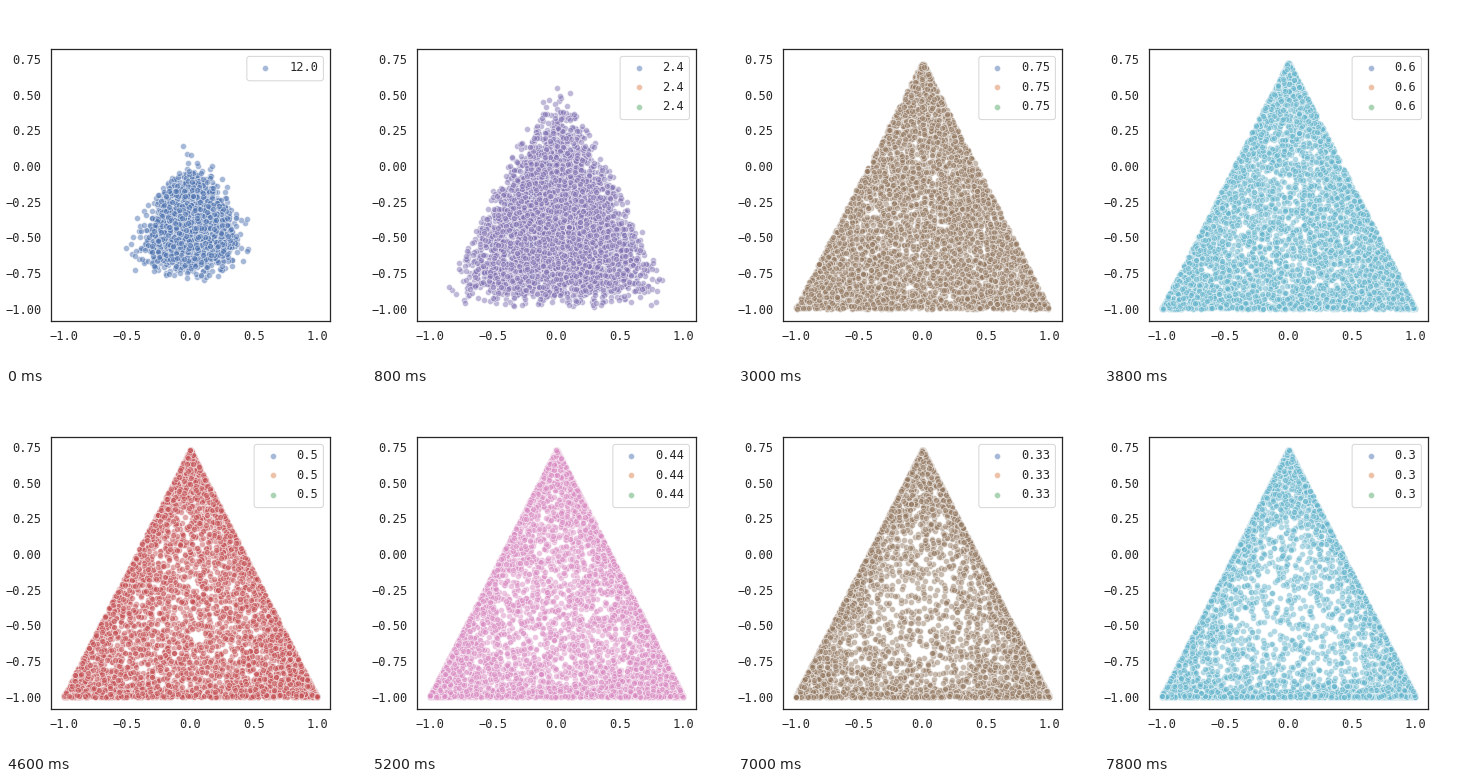
Recreate the animation shown at these times as a matplotlib script. Size 360x360 px, loop 8 s.

```python
import matplotlib.pyplot as plt
import numpy as np
from matplotlib.animation import FuncAnimation
from matplotlib.patches import FancyBboxPatch

SIZE, DPI = 360, 72
FRAMES, STEP_MS = 40, 200
POINTS = 5000
INK = "0.15"
PALETTE = ["#4C72B0", "#DD8452", "#55A868", "#C44E52", "#8172B3",
           "#937860", "#DA8BC3", "#8C8C8C", "#CCB974", "#64B5CD"]
TOP = np.sqrt(3) - 1
CORNERS = np.array([[-1, -1], [1, -1], [0, TOP]])
MARKER = dict(s=36, alpha=0.5, edgecolors="white", linewidths=0.8)

# legend layout in pixels
BOX_RIGHT, BOX_TOP, ROW = 317.4, 50.4, 19.4
CHAR = 7.26

plt.rcParams.update({
    "font.family": "DejaVu Sans Mono",
    "font.size": 12,
    "text.color": INK,
    "axes.edgecolor": INK,
    "axes.linewidth": 1.25,
})

fig = plt.figure(figsize=(SIZE / DPI, SIZE / DPI), dpi=DPI, facecolor="white")

ax = fig.add_axes([0.125, 0.125, 0.775, 0.755])
ax.set_xlim(-1.1, 1.1)
margin = 0.05 * (TOP + 1)
ax.set_ylim(-1 - margin, TOP + margin)
ax.set_xticks(np.arange(-1, 1.1, 0.5))
ax.set_yticks(np.arange(-1, 0.8, 0.25))
ax.tick_params(length=0, pad=9.5, labelcolor=INK)
cloud = ax.scatter([], [], **MARKER)

overlay = fig.add_axes([0, 0, 1, 1])
overlay.set_xlim(0, SIZE)
overlay.set_ylim(SIZE, 0)
overlay.axis("off")
box = FancyBboxPatch((0, 0), 1, 1, boxstyle="round,pad=0,rounding_size=2.6",
                     facecolor="white", edgecolor="0.8", linewidth=1, alpha=0.8)
overlay.add_patch(box)
rows = []
for k in range(3):
    dot = overlay.scatter([0], [0], c=[PALETTE[k]], zorder=3, **MARKER)
    text = overlay.text(0, BOX_TOP + 14.9 + k * ROW, "", ha="left", va="baseline")
    rows.append((dot, text))


def sample(i):
    rng = np.random.default_rng(100 + i)
    return rng.dirichlet([12 / (i + 1)] * 3, POINTS) @ CORNERS


def draw_legend(label, count):
    width = 47.5 + CHAR * len(label)
    left = BOX_RIGHT - width
    box.set_bounds(left, BOX_TOP, width, 24.4 + ROW * (count - 1))
    for k, (dot, text) in enumerate(rows):
        dot.set_offsets([[left + 18.5, BOX_TOP + 11.6 + k * ROW]])
        text.set_x(left + 42.2)
        text.set_text(label)
        dot.set_visible(k < count)
        text.set_visible(k < count)


def update(i):
    cloud.set_offsets(sample(i))
    cloud.set_facecolor(PALETTE[i % len(PALETTE)])
    draw_legend(str(round(12 / (i + 1), 2)), min(3, i + 1))
    return []


anim = FuncAnimation(fig, update, frames=FRAMES, interval=STEP_MS,
                     init_func=lambda: update(0), repeat=True, repeat_delay=0)
plt.show()
```
